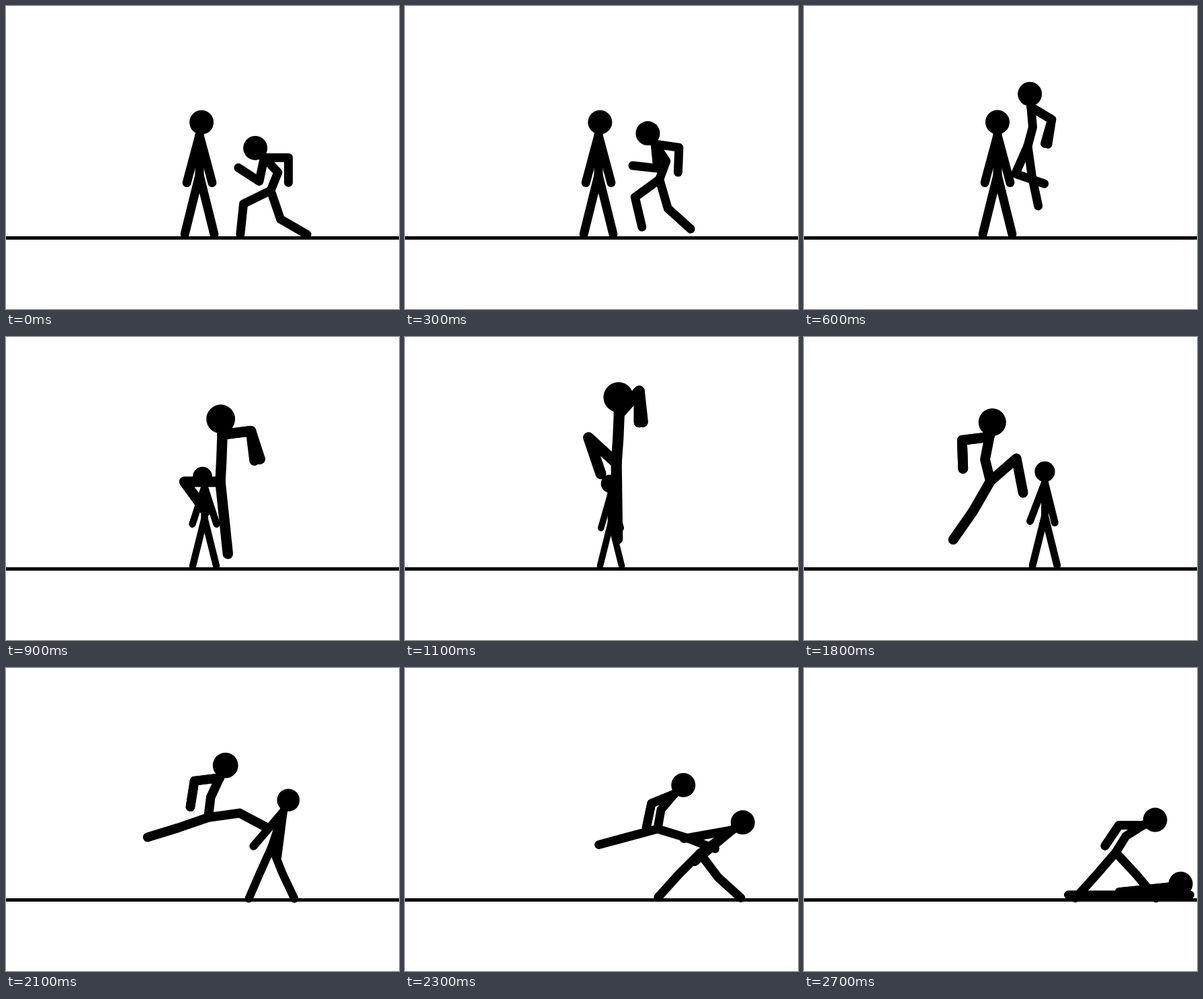
Animation of 585x450 px, one loop 2800 ms. Source, as an HTML page with a canvas:

```html
<!DOCTYPE html>
<html lang="en">
<head>
<meta charset="utf-8">
<title>Stick fight</title>
<style>
html, body { margin: 0; width: 100%; height: 100%; overflow: hidden; background: #fff; }
canvas { display: block; }
</style>
</head>
<body>
<canvas id="stage" width="585" height="450"></canvas>
<script>
const ctx = document.getElementById('stage').getContext('2d');
const LOOP = 2800, STEP = 100, GROUND = 344;

// Bone lengths at scale 1, where the head radius is 18
const BACK = [29, 30, 19.5], LEG = [45, 45.5], ARM = [36, 37];

const mix = (a, b, u) => a + (b - a) * u;

// Angles are in degrees, clockwise from the right, and are mixed without wrapping
function pose(time, s, x, y, [low, high, head = high], legA, legB, armA, armB = armA, ease = 1) {
  return { time, s, x, y, ease, angles: [[low, high, head], legA, legB, armA, armB] };
}

function stand(time, s, x, tilt = 0, left = 15, right = left) {
  const straight = a => [a, a];
  return pose(time, s, x, GROUND - 93 * s, [-90, -90, -90 + tilt],
    straight(104), straight(76), straight(90 + left), straight(90 - right));
}

const kicker = [
  pose(200, 1, 394, 274, [-68, -133], [154, 96], [71, 30], [0, 90], [102, 213]),
  pose(600, 1, 333, 208, [-75, -95], [114, 19], [82, 78], [31, 99], [31, 106]),
  pose(900, 1.19, 319, 215, [-87, -88, -96], [180, 54], [84, 84], [-7, 72], [-7, 83]),
  pose(1400, 1.33, 308, 212, [-84, -87], [286, 97], [97, 97], [-110, 101]),
  pose(1800, 1.14, 277.5, 214, [-104, -79], [319, 79], [120, 125], [-187, 88]),
  pose(2100, 1.05, 301, 222, [-83, -65], [352, 28], [161, 163], [-187, 99]),
  pose(2300, 1, 376, 239, [-80, -50, -44], [377, 21], [165, 165], [-202, 102], undefined, 1.6),
  pose(2700, 1, 464, 274, [-58, -32, -24], [407, 50], [131, 132], [-180, 124])
];

const victim = [
  stand(200, 1, 288, 9),
  stand(600, 1, 288),
  stand(900, 0.8, 295.5, -11, 18),
  stand(1400, 0.64, 323, 0, 13),
  stand(1800, 0.84, 358.5, 0, 21, 14),
  stand(2000, 0.9, 374, 9, 21, 14),
  pose(2300, 1, 439, 275, [-35, -36], [135, 132], [53, 42], [170, 170], [140, 140]),
  pose(2600, 1, 484, 337, [-9, -14], [180, 180], [0, 0], [174, 174])
];

function blend(track, time) {
  const last = track.length - 1;
  const next = track.findIndex(k => k.time > time);
  const i = (next < 0 ? last : next) - 1;
  const p = track[i], q = track[i + 1];
  const t = Math.min(1, (time - p.time) / (q.time - p.time));
  const u = 1 - (1 - t) ** p.ease;
  return {
    s: mix(p.s, q.s, u), x: mix(p.x, q.x, u), y: mix(p.y, q.y, u),
    angles: p.angles.map((limb, n) => limb.map((a, j) => mix(a, q.angles[n][j], u)))
  };
}

function draw({ s, x, y, angles: [back, legA, legB, armA, armB] }) {
  // Draws a chain of bones and returns its joints
  const chain = (start, lengths, turns) => {
    const joints = [start];
    lengths.forEach((d, i) => {
      const a = turns[i] * Math.PI / 180, [px, py] = joints[i];
      joints.push([px + Math.cos(a) * d * s, py + Math.sin(a) * d * s]);
    });
    ctx.beginPath();
    joints.forEach(j => ctx.lineTo(...j));
    ctx.stroke();
    return joints;
  };
  ctx.lineWidth = 13 * s;
  const [hip, , neck, head] = chain([x, y], BACK, back);
  chain(hip, LEG, legA);
  chain(hip, LEG, legB);
  chain(neck, ARM, armA);
  chain(neck, ARM, armB);
  ctx.beginPath();
  ctx.arc(...head, 18 * s, 0, Math.PI * 2);
  ctx.fill();
}

function frame() {
  // The opening pose is held until 300 ms
  const now = (performance.now() - start) % LOOP;
  const time = Math.max(200, Math.floor(now / STEP) * STEP);
  const vault = Math.min(1, Math.max(0, (time - 900) / 500));
  const hero = blend(kicker, time);
  hero.y -= 28 * Math.sin(Math.PI * vault);

  ctx.fillStyle = '#fff';
  ctx.fillRect(0, 0, 585, 450);
  ctx.fillStyle = ctx.strokeStyle = '#000';
  ctx.lineCap = ctx.lineJoin = 'round';
  ctx.fillRect(0, 342, 585, 5);
  draw(blend(victim, time));
  draw(hero);
  requestAnimationFrame(frame);
}

const start = performance.now();
frame();
</script>
</body>
</html>
```
